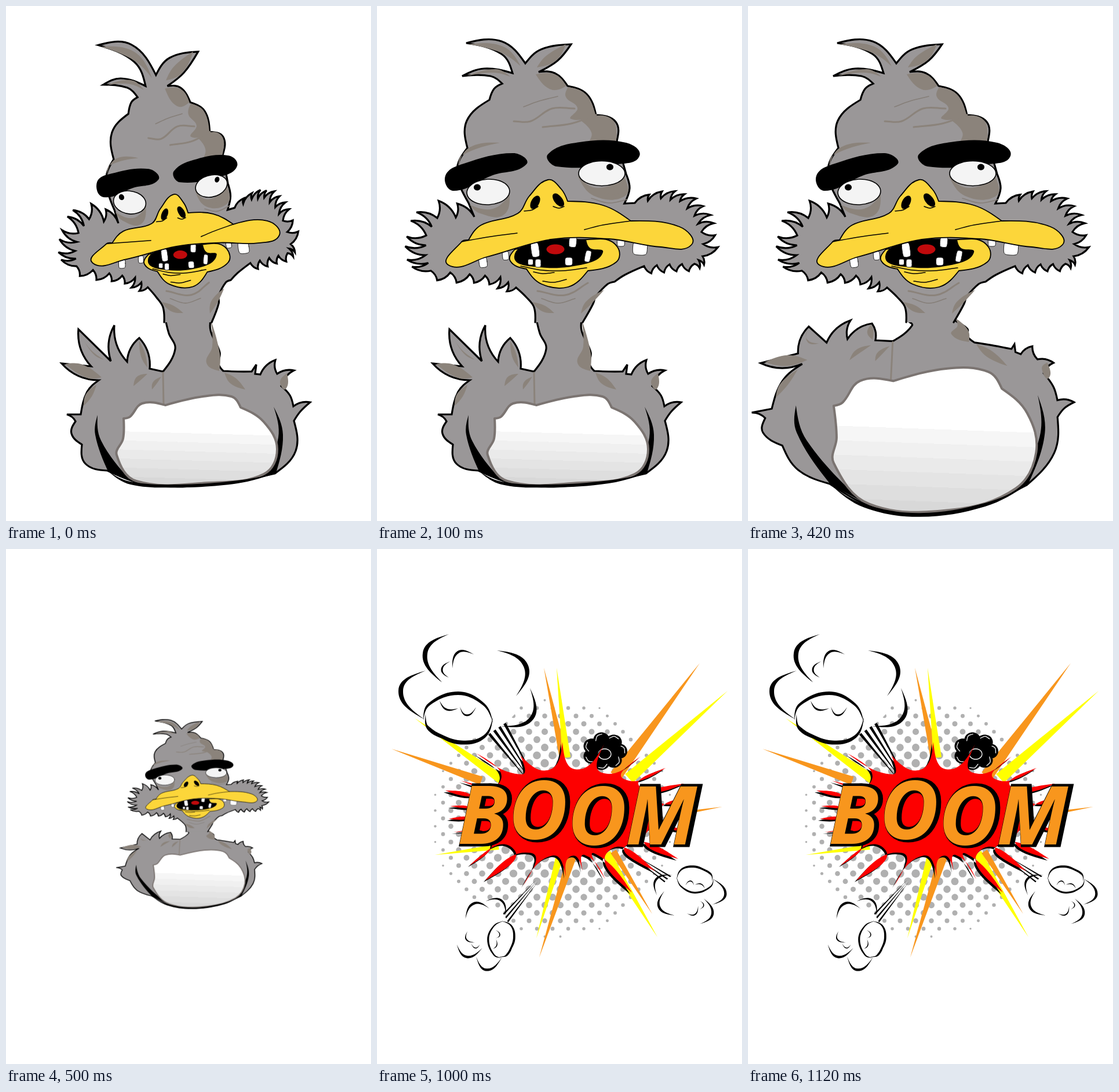
An HTML page for the animation above (1.2 s loop, 630 by 889 pixels).

```html
<!DOCTYPE html>
<html lang="en">
<head>
<meta charset="utf-8">
<title>Duck goes boom</title>
<style>
html, body { margin: 0; width: 100%; height: 100%; overflow: hidden; background: #fff; }
svg { display: block; width: 100%; height: 100%; }
path { fill: none; stroke-linejoin: round; stroke-linecap: round; }
.skin { fill: #9a9798; stroke: #000; stroke-width: 3.2; stroke-linejoin: miter; stroke-miterlimit: 4; }
.shade { fill: #8b837b; }
.fold { stroke: #8b837b; stroke-width: 3; }
.thin { stroke: #857e78; stroke-width: 1.6; }
.beak { fill: #fcd63a; stroke: #000; stroke-width: 1.8; }
.line { stroke: #000; stroke-width: 1.5; }
.ink { fill: #000; }
.eye { fill: #f4f4f4; stroke: #000; stroke-width: 1.6; }
.tooth { fill: #fff; stroke: #222; stroke-width: 1; }
.tongue { fill: #c00a0c; }
.belly { fill: url(#bands); stroke: #7b7471; stroke-width: 4; }
.white { fill: #fff; }
.chalk { stroke: #fff; stroke-width: 1.3; }
.orange { fill: #f8961d; }
.yellow { fill: #ffff00; }
.red { fill: #fd0000; }
.dot { fill: #b0b0b0; }
text { font: italic 700 140px "Open Sans", "Noto Sans", sans-serif; }
.shadow { stroke: #000; stroke-width: 9; transform: translate(4px, 0); }

g.timed { visibility: hidden; animation: 1.2s step-end infinite; }
#headSmall { animation-name: start; }
#headBig { animation-name: swell; }
#bodySmall { animation-name: calm; }
#bodyBig { animation-name: bloat; }
#boom { animation-name: burst; }
#duck { animation: shrink 1.2s step-end infinite; }
@keyframes start { 0% { visibility: visible } 8.3333% { visibility: hidden } }
@keyframes swell { 0% { visibility: hidden } 8.3333% { visibility: visible } 83.3333% { visibility: hidden } }
@keyframes calm { 0% { visibility: visible } 25% { visibility: hidden } }
@keyframes bloat { 0% { visibility: hidden } 25% { visibility: visible } 83.3333% { visibility: hidden } }
@keyframes burst { 0% { visibility: hidden } 83.3333%, 100% { visibility: visible } }
@keyframes shrink {
  0% { transform: none }
  41.6667% { transform: matrix(.4526, 0, 0, .397, 187.2, 271.4) }
  83.3333% { transform: none }
}
</style>
</head>
<body>
<svg viewBox="0 0 630 889">
  <defs><linearGradient id="bands" x1="0" y1="0" x2="-.05" y2="1"></linearGradient></defs>
  <g id="duck">
    <g class="timed" id="bodySmall"></g>
    <g class="timed" id="bodyBig"></g>
    <g class="timed" id="headSmall"></g>
    <g class="timed" id="headBig"></g>
  </g>
  <g class="timed" id="boom">
    <g id="blast"></g>
    <text id="letters" class="orange"><tspan x="139" y="509">B</tspan><tspan x="227" y="501">O</tspan><tspan x="329" y="511">O</tspan><tspan x="429" y="510">M</tspan></text>
  </g>
</svg>
<script>
const NS = 'http://www.w3.org/2000/svg';
const $ = id => document.getElementById(id);
const same = (x, y) => [x, y];
const clamp = (v, lo, hi) => Math.max(lo, Math.min(hi, v));
let seed = 7;
const random = () => (seed = seed * 16807 % 2147483647) / 2147483647;

function make(parent, tag, attrs) {
  const el = document.createElementNS(NS, tag);
  for (const k in attrs) el.setAttribute(k, attrs[k]);
  return parent.appendChild(el);
}

// Marks after a point: "!" corner, "<" or ">" corner whose next edge bows left or right.
function parse(text, warp = same) {
  return text.match(/[\d.-]+,[\d.-]+[!<>]?/g).map(t => {
    const [x, y] = warp(...t.replace(/[!<>]/, '').split(',').map(Number));
    return { x, y, mark: /[!<>]$/.test(t) ? t.at(-1) : '' };
  });
}
const token = (x, y, mark = '') => `${x.toFixed(1)},${y.toFixed(1)}${mark}`;
const half = (a, b) => ({ x: (a.x + b.x) / 2, y: (a.y + b.y) / 2 });

// Smooth outline through the points; a final "z" closes it.
function trace(text, warp) {
  const pts = parse(text, warp), n = pts.length, closed = text.endsWith('z');
  const at = i => closed ? pts[(i + n) % n] : pts[clamp(i, 0, n - 1)];
  const f = p => p.x.toFixed(1) + ' ' + p.y.toFixed(1);
  const handle = (i, len) => {
    const p = at(i), dx = at(i + 1).x - at(i - 1).x, dy = at(i + 1).y - at(i - 1).y;
    const l = Math.hypot(dx, dy) || 1;
    return { x: p.x + dx / l * len, y: p.y + dy / l * len };
  };
  let d = 'M' + f(pts[0]);
  for (let i = 0; i < (closed ? n : n - 1); i++) {
    const a = at(i), b = at(i + 1), dx = b.x - a.x, dy = b.y - a.y;
    if (a.mark && b.mark) {
      const bow = { '<': .22, '>': -.22 }[a.mark] || 0, m = half(a, b);
      d += 'Q' + f({ x: m.x + dy * bow, y: m.y - dx * bow }) + ' ' + f(b);
      continue;
    }
    const len = Math.hypot(dx, dy) * .36;
    let c1 = a.mark ? null : handle(i, len), c2 = b.mark ? null : handle(i + 1, -len);
    c1 = c1 || half(a, c2);
    c2 = c2 || half(b, c1);
    d += 'C' + f(c1) + ' ' + f(c2) + ' ' + f(b);
  }
  return d + (closed ? 'Z' : '');
}

function paint(group, list, warp) {
  for (const [cls, pts] of list) make(group, 'path', { class: cls, d: trace(pts, warp) });
}

// Closed ring of points; power below 1 makes it boxier.
function oval(cx, cy, rx, ry, tilt = 0, power = 1) {
  const r = tilt * Math.PI / 180, bend = v => Math.sign(v) * Math.abs(v) ** power;
  let out = '';
  for (let i = 0; i < 12; i++) {
    const a = i * Math.PI / 6, x = rx * bend(Math.cos(a)), y = ry * bend(Math.sin(a));
    out += token(cx + x * Math.cos(r) - y * Math.sin(r), cy + x * Math.sin(r) + y * Math.cos(r)) + ' ';
  }
  return out + 'z';
}
const tooth = (x, y, w, h, tilt) => ['tooth', oval(x, y, w / 2, h / 2, tilt, .5)];

// Hooked tufts of random length along a base line, blown towards (lx, ly).
function fur(base, count, length, lx, ly) {
  const p = parse(base), out = [];
  const on = t => {
    const s = clamp(t, 0, .999) * (p.length - 1), i = Math.floor(s), a = p[i], b = p[i + 1];
    return { x: a.x + (b.x - a.x) * (s - i), y: a.y + (b.y - a.y) * (s - i), dx: b.x - a.x, dy: b.y - a.y };
  };
  for (let i = 0; i < count; i++) {
    const v = on(i / count), m = on((i + .5) / count);
    const k = length * (.75 + .5 * random()) / Math.hypot(m.dx, m.dy), ahead = lx * m.dx + ly * m.dy > 0;
    out.push(token(v.x, v.y, ahead ? '<' : '>'), token(m.x + m.dy * k + lx, m.y - m.dx * k + ly, ahead ? '>' : '<'));
  }
  return out.join(' ');
}

// Brush stroke, thin at both ends.
function swoosh(text, w) {
  const p = parse(text), n = p.length - 1;
  const side = s => p.map((q, i) => {
    const a = p[Math.max(0, i - 1)], b = p[Math.min(n, i + 1)];
    const o = s * w / 2 * Math.sin(Math.PI * i / n) / Math.hypot(b.x - a.x, b.y - a.y);
    return token(q.x + (b.y - a.y) * o, q.y - (b.x - a.x) * o, i % n ? '' : '!');
  });
  return ['ink', [...side(1), ...side(-1).reverse().slice(1, -1)].join(' ') + ' z'];
}

// Straight spike from a wide base to a point.
function spike(cls, x, y, bx, by, w) {
  const k = w / 2 / Math.hypot(bx - x, by - y), nx = (by - y) * k, ny = (x - bx) * k;
  return [cls, `${token(x, y, '!')} ${token(bx + nx, by + ny, '!')} ${token(bx - nx, by - ny, '!')} z`];
}

// The swollen head squeezed back to its narrow, relaxed form.
function relax(x, y) {
  const u = x - 285;
  const dip = Math.sqrt(Math.sin(Math.PI * clamp((y - 60) / 460, 0, 1)));
  const drop = 31 * Math.sin(Math.PI * clamp((y - 50) / 435, 0, 1) ** .65);
  const lean = .05 * u * Math.max(0, 1 - y / 350);
  return [285 - 2.5 * dip + (1 - .28 * dip) * u - .00018 * dip * u * u, y + drop + lean - .0005 * dip * u * u];
}

// The calm body blown up around its belly.
function bloat(x, y) {
  const side = Math.min(.44 * (x - 330), 38) * Math.sin(Math.PI * clamp((y - 535) / 320, 0, 1));
  const rise = 55 * Math.sin(Math.PI * Math.max(0, (y - 535) / 215));
  return [x + side, y - rise * Math.max(0, 1 - ((x - 310) / 215) ** 2)];
}

const headOutline = [
  '273,546! 271,520 258,503',
  fur('240,486 213,468 160,463 93,457', 6, 10, -5, 5),
  fur('93,457 84,430 85,396 104,366 168,364', 8, 20, -13, -6),
  '168,364! 158,340! 138,285 156,245! 155,198 194,162! 202,143 216,134!',
  '196,121 147,121! 185,108 234,116! 215,83 154,64! 215,61 256,99!',
  '283,75 335,66! 312,94 279,114! 307,116 329,138! 362,152 378,188! 412,200 414,233! 430,290! 436,315 427,341!',
  fur('445,340 490,332 523,337 548,362 560,390 566,432', 10, 9, 15, -4),
  fur('562,432 548,445 505,446 461,449', 6, 6, 1, 6),
  '461,449! 428,464 410,476! 398,480 376,503! 373,514 355,546!'
].join(' ');

const head = [
  ['skin', headOutline],
  ['shade', '158,66! 218,70 248,104! 215,81z'],
  ['shade', '155,121! 205,109 230,122! 200,115z'],
  ['shade', '326,66! 292,86 276,106! 308,95z'],
  ['shade', '274,118! 307,118 327,138! 300,144z'],
  ['shade', '330,140! 360,152 377,187! 335,195 346,176 326,157z'],
  ['shade', '352,198! 402,193 413,233! 366,234! 370,218z'],
  ['shade', '212,236! 160,244 140,276! 148,257z'],
  ['fold', '236,199 265,199 302,177 341,177'],
  ['thin', '253,174 280,164 312,156'],
  ['fold', '286,209 335,203 378,188'],
  ['shade', '160,343! 200,350 229,325! 218,361 178,358z'],
  ['shade', '346,292! 380,314 427,295! 428,328 375,328z'],
  ['fold', '392,322 408,327 424,321'],
  ['thin', '370,332 400,340 432,334'],
  ['fold', '277,492 325,499 364,478'],
  ['thin', '284,505 312,513 342,505'],
  ['shade', '268,511! 289,517 306,530! 285,527z'],
  ['shade', '392,490! 361,510 352,531! 373,511z'],
  ['ink', '118,293 150,272 236,254 258,273 200,292 132,319z'],
  ['ink', '295,256 350,235 430,236 453,259 415,273 310,277z'],
  ['eye', oval(192, 321, 37, 22, -3)],
  ['ink', oval(173, 313, 6, 5.5)],
  ['eye', oval(388, 289, 40, 21.5)],
  ['ink', oval(402, 278, 6, 5.5)],
  tooth(183, 442, 14, 19, -8), tooth(222, 431, 11, 15, -5), tooth(421, 408, 13, 14), tooth(454, 418, 25, 24, 3),
  ['beak', '238,420! 230,440 258,454! 284,480 330,485 364,457! 413,442 415,416 385,402z'],
  ['ink', '237,432 285,406 361,403! 368,418 390,425 360,445 280,451z'],
  ['tongue', oval(308, 420, 15.5, 8.5)],
  tooth(273, 421, 14, 25, -8), tooth(338, 407, 13, 19, 5), tooth(265, 442, 9, 10), tooth(278, 444, 10, 14),
  tooth(331, 441, 13, 14), tooth(364, 432, 10, 20, 12),
  ['beak', `158,404! 180,378 243,358 263,328 295,300 318,316 329,337! 390,344 438,371! 522,381 543,412 490,416
    400,402 300,403 190,433 123,447 146,407z`],
  ['line', '146,407 190,399 242,392'],
  ['line', '358,386 390,378 438,371'],
  ['line', '254,354 268,352 278,346'],
  ['line', '304,346 314,349 323,346'],
  ['ink', oval(273, 339, 7, 12.5, 28)],
  ['ink', oval(313, 335, 7, 13.5, -38)],
  ['line', '248,449 285,456 320,457 362,452'],
  ['line', '270,459 286,462 306,460'],
  ['line', '286,475 305,477 327,472']
];

const bodyOutline = `274,535! 281,565 292,592 271,631! 248,626> 230,573> 209,614< 187,551> 181,613! 125,558> 147,622!
  96,617> 160,646! 140,666 129,705! 105,705< 120,717! 113,738 131,757! 137,790 175,802! 250,827 360,826 464,807!
  500,768 497,716! 508,700 525,684> 496,691! 490,672 475,656< 497,629> 468,635< 465,611> 439,636! 430,635! 432,619!
  424,631! 400,631 375,630! 367,618 369,598 353,560 354,535!`;

const body = [
  ['skin', bodyOutline],
  ['shade', '353,540! 356,588 346,616 368,630! 369,600z'],
  ['shade', '128,564! 150,600 170,611! 145,592z'],
  ['shade', '230,578! 240,600 244,624! 233,605z'],
  ['shade', '102,618! 132,619 165,641! 140,642z'],
  ['shade', '134,690! 138,670 156,654! 148,674z'],
  ['shade', '377,633! 388,652 413,662! 396,642z'],
  ['shade', '268,640! 254,649 252,662! 260,652z'],
  ['shade', '244,635! 226,640 220,656! 232,646z'],
  ['shade', '485,634! 473,649 483,661z'],
  ['fold', '271,633 272,688'],
  ['ink', '158,706! 164,750 214,818! 176,803! 154,740z'],
  ['ink', '462,692! 470,745 443,811! 466,806! 478,740z'],
  ['belly', `203,712! 214,709 235,686 275,689! 340,674 389,674 405,693! 445,718 468,765 445,808 350,823 225,820
    191,775 202,747z`],
  ['ink', '176,803! 215,821 300,826 400,819 464,807! 400,824 300,831 215,826z']
];

// One cloud serves for all three puffs of smoke.
const cloud = [
  ['white', oval(155, 240, 100, 80)],
  swoosh('124,147 83,180 112,230', 8),
  swoosh('130,206 140,178 167,182', 4),
  swoosh('126,194 112,208 124,222', 3),
  swoosh('207,175 257,202 240,254', 8),
  swoosh('264,240 267,292 214,306', 7),
  swoosh('84,210 41,245 82,294', 8),
  ['white', oval(142, 290, 58, 41)],
  swoosh('80,296 90,268 140,249 184,268 200,300', 6),
  swoosh('200,290 185,324 145,334 105,320 85,302', 7),
  swoosh('84,285 90,312 130,331', 4),
  swoosh('108,262 120,277 140,275', 3),
  swoosh('143,272 155,287 171,273', 3)
];
function puff(group, x, y, turn, size) {
  paint(make(group, 'g', { transform: `translate(${x} ${y}) rotate(${turn}) scale(${size}) translate(-155 -240)` }), cloud);
}

// Bundle of speed lines from a puff down to one point.
function stem(x1, y1, x2, y2, w, count) {
  const l = Math.hypot(x2 - x1, y2 - y1), nx = (y2 - y1) / l * w, ny = (x1 - x2) / l * w;
  const lines = [spike('white', x2, y2, x1, y1, w)];
  for (let i = 0; i < count; i++) {
    const k = i / (count - 1) - .5;
    lines.push(spike('ink', x2 + nx * k * .3, y2 + ny * k * .3, x1 + nx * k, y1 + ny * k, w / count * .6));
  }
  return lines;
}

const ray = (cls, x, y, bx, by) => spike(cls, x, y, bx, by, .09 * Math.hypot(bx - x, by - y));
const rays = [
  ray('orange', 288, 205, 322, 360), ray('yellow', 310, 205, 327, 360),
  ray('orange', 557, 197, 412, 392), ray('yellow', 605, 245, 435, 396),
  ray('orange', 25, 345, 180, 400), ray('yellow', 65, 292, 238, 414),
  ray('orange', 596, 445, 540, 454), ray('yellow', 100, 528, 210, 514),
  ray('yellow', 275, 672, 317, 525), ray('orange', 280, 705, 338, 525),
  ray('yellow', 484, 670, 396, 525), ray('orange', 475, 630, 408, 522)
];

// Tips joined through valleys that lie on an ellipse around the middle.
function star(tips) {
  const p = parse(tips);
  return p.map((a, i) => {
    const m = half(a, p[(i + 1) % p.length]), t = Math.atan2((m.y - 455) / 75, (m.x - 325) / 160);
    return token(a.x, a.y, '!') + ' ' + token(325 + 160 * Math.cos(t), 455 + 75 * Math.sin(t));
  }).join(' ') + ' z';
}
const burst = star(`118,417 126,444 124,466 132,489 160,546 187,572 252,582 326,566 355,556 394,570 440,593 480,556
  520,535 545,490 556,430 530,405 498,378 455,358 392,337 320,333 248,357 172,353 145,400`);

function halftone(group) {
  for (let row = -15; row <= 15; row++)
    for (let col = -8; col <= 8; col++) {
      const x = 27 * col + (row % 2 ? 13.5 : 0), y = 13.6 * row, d = Math.hypot(x, y);
      if (d < 207) make(group, 'circle', { class: 'dot', cx: 303 + x, cy: 465 + y, r: (8.5 * Math.sqrt(1 - (d / 212) ** 1.6)).toFixed(2) });
    }
}

function soot(group, cx, cy) {
  paint(group, [['ink', oval(cx, cy, 27, 25)]]);
  for (let i = 0; i < 7; i++) {
    const a = i * Math.PI * 2 / 7, x = cx + 25 * Math.cos(a), y = cy + 20 * Math.sin(a);
    const rim = k => token(x + 10 * Math.cos(a + k), y + 10 * Math.sin(a + k));
    paint(group, [['ink', oval(x, y, 14, 13)], ['chalk', `${rim(-1.5)} ${rim(-.6)} ${rim(.3)}`]]);
  }
  paint(group, [['chalk', oval(cx, cy + 5, 11, 9)]]);
}

const bands = $('bands');
for (let i = 0; i < 7; i++) {
  const tone = i ? 252 - 6 * i : 255, color = `rgb(${tone},${tone},${tone})`;
  make(bands, 'stop', { offset: i ? .3 + .1 * i : 0, 'stop-color': color });
  make(bands, 'stop', { offset: .4 + .1 * i, 'stop-color': color });
}

paint($('bodySmall'), body);
paint($('bodyBig'), body, bloat);
paint($('headSmall'), head, relax);
paint($('headBig'), head);

const blast = $('blast');
halftone(blast);
paint(blast, rays);
paint(blast, [...stem(207, 310, 270, 403, 32, 4), ...stem(509, 575, 443, 530, 14, 3), ...stem(220, 639, 276, 573, 14, 3)]);
puff(blast, 155, 240, 0, 1);
puff(blast, 541, 598, 180, .53);
puff(blast, 187, 666, -90, .53);
soot(blast, 393, 349);
paint(blast, [['ink', burst]], (x, y) => [x - 3, y + 3]);
paint(blast, [['red', burst]]);

const letters = $('letters'), shadow = letters.cloneNode(true);
shadow.removeAttribute('id');
shadow.setAttribute('class', 'shadow');
letters.before(shadow);
</script>
</body>
</html>
```
